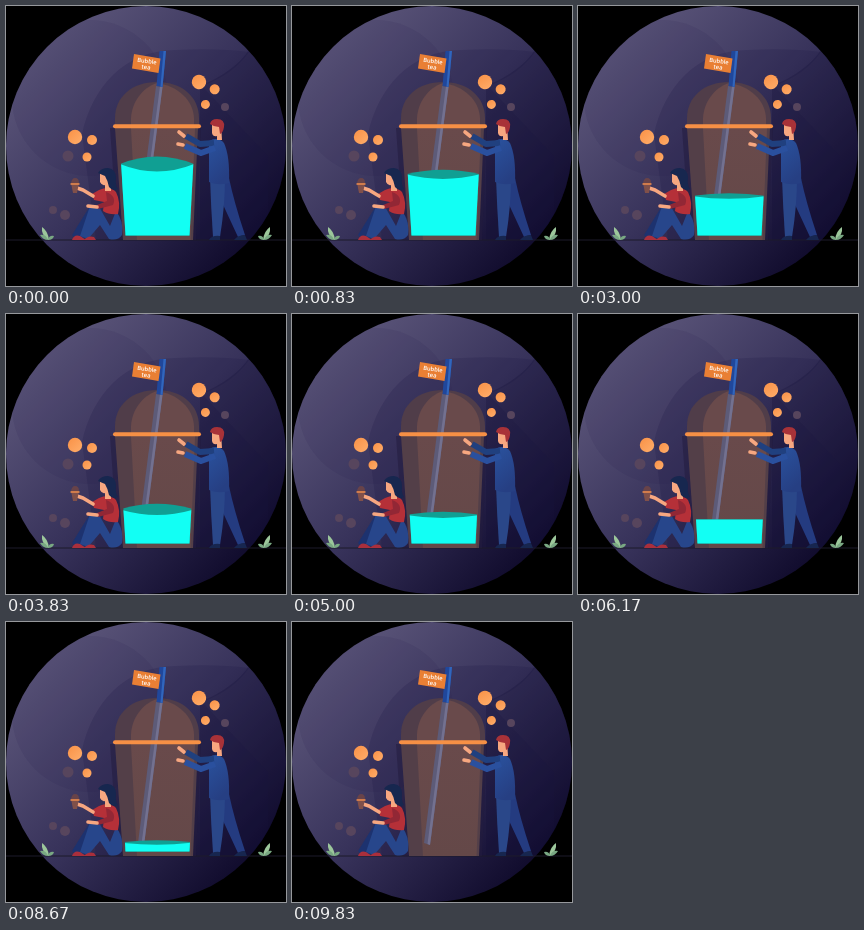
These frames come from a looping animation (280 px wide and 280 px high, 9990 ms). An HTML page:

```html
<!DOCTYPE html>
<html lang="en">
<head>
<meta charset="utf-8">
<title>Bubble tea</title>
<style>
html, body { margin: 0; height: 100%; overflow: hidden; background: #000; }
svg { display: block; width: 100vw; height: 100vh; }
text { font: 600 5.8px "Open Sans", Roboto, sans-serif; fill: #fff; text-anchor: middle; }
.skin { fill: #f7a780; }
.limb { fill: none; stroke: #f7a780; stroke-width: 3.6; stroke-linecap: round; stroke-linejoin: round; }
.sleeve { fill: none; stroke-width: 6; stroke-linejoin: round; }
</style>
</head>
<body>
<svg viewBox="0 0 280 280">
  <defs>
    <linearGradient id="night" x1=".08" y1=".15" x2=".85" y2=".9">
      <stop offset="0" stop-color="#5d577b"/>
      <stop offset=".5" stop-color="#38335b"/>
      <stop offset="1" stop-color="#0f0a2b"/>
    </linearGradient>
    <linearGradient id="ball" x2="1" y2="1">
      <stop offset="0" stop-color="#f99146"/>
      <stop offset="1" stop-color="#ffae6b"/>
    </linearGradient>
    <linearGradient id="glass" x2="0" y2="1">
      <stop offset="0" stop-color="#694a4b"/>
      <stop offset="1" stop-color="#644848"/>
    </linearGradient>
    <linearGradient id="suit" x2=".4" y2="1">
      <stop offset="0" stop-color="#2a529e"/>
      <stop offset="1" stop-color="#263f83"/>
    </linearGradient>
    <clipPath id="disc"><circle cx="140" cy="140" r="140"/></clipPath>
    <clipPath id="inside"><path d="M114.500 148L119.500 229.500H183.500L187.800 148Z"/></clipPath>
    <g id="trio" fill="url(#ball)">
      <circle r="7.200"/><circle cx="17" cy="3" r="5"/><circle cx="12" cy="20" r="4.500"/>
    </g>
    <g id="plant" fill="#9cc79b">
      <path d="M0 1Q-7 -4 -6 -12Q0 -8 1 1Z"/>
      <path d="M0 1Q-5 1 -8 -4Q-2 -5 0 1Z" fill="#79a883"/>
      <path d="M0 1Q1 -4 6 -3Q5 1 0 1Z" fill="#79a883"/>
    </g>
  </defs>

  <g clip-path="url(#disc)">
    <rect width="280" height="280" fill="url(#night)"/>
    <circle cx="84" cy="92" r="78" fill="#1d1944" opacity=".1"/>
    <path d="M76 128C86 82 118 44 170 44Q212 42 243 46Q228 68 196 80L262 150V234H90Z" fill="#1b1740" opacity=".2"/>
    <path d="M243 44Q228 66 194 80V234H280V92Z" fill="#120e34" opacity=".25"/>
  </g>
  <path d="M0 234H280" stroke="#1c1b2b"/>

  <use href="#trio" x="69" y="131"/>
  <use href="#trio" transform="translate(193 76) rotate(15)"/>
  <g fill="#57455d">
    <circle cx="62" cy="150" r="5.500"/><circle cx="47" cy="204" r="4"/>
    <circle cx="59" cy="209" r="5"/><circle cx="219" cy="101" r="4"/>
  </g>
  <use href="#plant" x="42" y="233"/>
  <use href="#plant" transform="matrix(-1 0 0 1 258 233)"/>

  <!-- cup and straw -->
  <path d="M104 122H195L190 234H112Z" fill="#241d3f" opacity=".55"/>
  <path d="M109 119V112C109 91 126 76 151 76S193 91 193 112V119Z" fill="#503d49"/>
  <path d="M125 119V112C126 96 136 82 151 77C172 80 187 94 188 112V119Z" fill="#694a4b"/>
  <path d="M109 122H192L187 234H117Z" fill="#533f48"/>
  <path d="M125 122H189L184.500 234H131Z" fill="url(#glass)"/>
  <path d="M150 80L156.500 81L138 223L132 221Z" fill="#5d5b78"/>
  <path d="M154 80L156.500 81L138 223L135.500 222Z" fill="#737190"/>
  <path d="M153.500 45H160L156.500 81L150.500 80Z" fill="#20479b"/>
  <path d="M157.500 45H160L156.500 81L154.500 80.500Z" fill="#3166bd"/>
  <path d="M128 48L154.500 52.500L152.500 67L126 62.500Z" fill="#e97f34"/>
  <g transform="rotate(8 140 58)"><text x="140.500" y="57">Bubble</text><text x="140.500" y="63">tea</text></g>
  <path d="M109 120.200H193" stroke="#f69045" stroke-width="4" stroke-linecap="round"/>

  <g clip-path="url(#inside)">
    <path id="back" fill="#109f93"/>
    <path id="front" fill="#12fff4"/>
  </g>

  <!-- seated woman -->
  <path d="M84 200L66 229L70 233L78 232L94 212Z" fill="#1d326f"/>
  <path d="M84 200Q92 197 96 206L104 220L110 205Q118 215 116 229Q112 235 103 233L94 219L82 233L74 230Z" fill="#27468b"/>
  <path d="M66 234Q68 228 74 230L80 234ZM78 234Q82 229 88 231L90 234Z" fill="#a92f3c"/>
  <path d="M93 184Q104 179 110 186Q115 196 112 208Q103 209 97 205L98 196L88 194L86 188Z" fill="#b53038"/>
  <path d="M100 186Q111 190 107 199L92 203L91 199L101 195Z" fill="#922735"/>
  <path class="limb" d="M87 190L77 184L71 182M91 201L82 200"/>
  <path class="skin" d="M94 167V176Q96 180 99 179V185H105V167Z"/>
  <path d="M92 167Q95 162 102 162Q110 163 110 172Q109 179 112 183Q107 186 103 181Q102 175 99 170Z" fill="#17274f"/>
  <path d="M65 177H73L71 187H67Z" fill="#80504a"/>
  <path d="M65 177Q66 172 69 172Q73 172 73 177Z" fill="#684349"/>
  <path d="M64.500 178H73.500" stroke="#ed8b4c" stroke-width="1.500"/>

  <!-- standing man -->
  <path d="M208 172H223Q228 196 239 229L232 231L213 190Z" fill="#243b80"/>
  <path d="M204 172H219Q219 200 214 231H207Q205 202 204 172Z" fill="#2a4789"/>
  <path d="M203 234Q206 229 214 230V234ZM228 234Q232 229 239 229L241 234Z" fill="#17264f"/>
  <path d="M203 135Q212 130 218 137Q224 150 223 177Q212 180 203 176Z" fill="url(#suit)"/>
  <path class="sleeve" d="M208 137L194 138L180 130" stroke="#20407f"/>
  <path class="sleeve" d="M209 142L195 147L179 140" stroke="#2a509e"/>
  <path class="limb" d="M178 130L173 126M177 139L172 138"/>
  <path class="skin" d="M206 118V127Q207 131 211 130V134H216L215 118Z"/>
  <path d="M204 118Q205 113 211 113Q219 113 218 121Q217 127 214 128L213 121Q208 121 204 118Z" fill="#a83238"/>
</svg>
<script>
const LOOP = 9990, EMPTY = 9830, RATE = 0.006; // ms, ms, pictures per ms
const FULL = 158, FLOOR = 230;
const { sin, cos, sqrt, floor, min, PI } = Math;
const front = document.getElementById('front');
const back = document.getElementById('back');

const surface = (y, bulge) => `M114 ${y}Q151 ${y + 2 * bulge} 188 ${y}V${FLOOR}H114Z`;

function draw(now) {
  const t = floor((now % LOOP + 4) * RATE) / RATE;
  const u = min(t / EMPTY, 1);
  // drains fast, slows down halfway, then runs out
  const drained = u + 0.09 * sin(PI * u) + 0.07 * sin(2 * PI * u);
  const y = FULL + (FLOOR - FULL) * drained;
  const swell = 7.5 * sqrt(1 - u) * cos(PI * t / 4100) ** 2;
  front.setAttribute('d', surface(y, swell));
  back.setAttribute('d', surface(y, -swell));
}

const start = performance.now();
function loop() {
  draw(performance.now() - start);
  requestAnimationFrame(loop);
}
loop();
</script>
</body>
</html>
```
